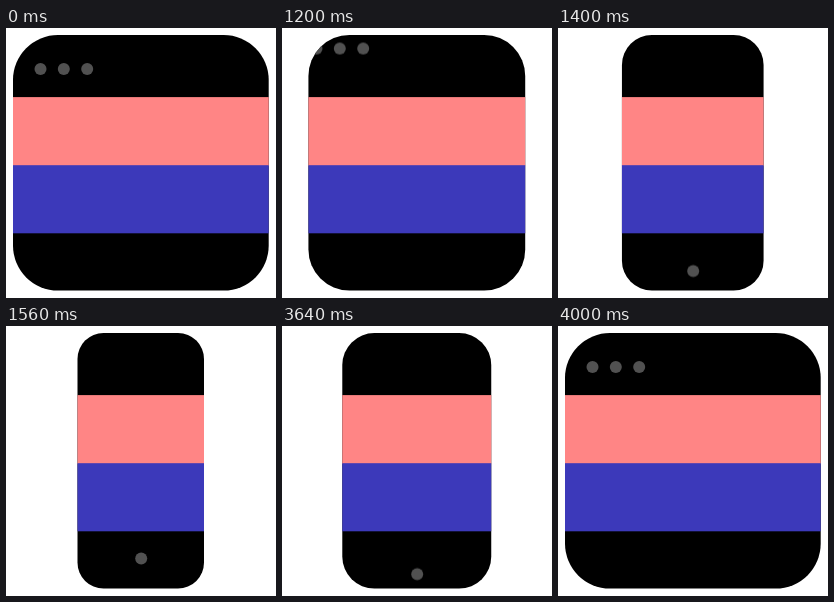
Write an HTML page that moves like this. It is 270 px wide and 270 px high and loops after 5.04 s.

```html
<!DOCTYPE html>
<html lang="en">
<head>
<meta charset="utf-8">
<title>Window to phone</title>
<style>
  html, body { margin: 0; width: 100%; height: 100%; overflow: hidden; background: #fff; }
  svg { display: block; width: 100%; height: 100%; }

  .shell { animation: width 5040ms infinite, corner 5040ms infinite; }
  .dots { animation: dots 5040ms infinite; }
  .home { animation: home 5040ms infinite; }

  @keyframes width {
    0%, 100% { x: 7px; width: 255.7px; }
    19.8413% { x: 7px; width: 255.7px; animation-timing-function: cubic-bezier(.44, 0, .46, 1); }
    30.9524% { x: 71.5px; width: 126.5px; }
    68.254% { x: 71.5px; width: 126.5px; animation-timing-function: cubic-bezier(.58, 0, .587, 1); }
    79.3651% { x: 7px; width: 255.7px; }
  }
  @keyframes corner {
    0%, 100% { rx: 45px; ry: 45px; }
    19.8413% { rx: 45px; ry: 45px; animation-timing-function: cubic-bezier(.5, 0, .62, 1); }
    30.9524% { rx: 26px; ry: 26px; }
    68.254% { rx: 26px; ry: 26px; animation-timing-function: cubic-bezier(.42, 0, .45, 1); }
    79.3651% { rx: 45px; ry: 45px; }
  }
  @keyframes dots {
    0%, 100% { transform: translateY(0); }
    19.8413% { transform: translateY(0); animation-timing-function: cubic-bezier(.44, 0, .46, 1); }
    30.9524% { transform: translateY(-68px); }
    68.254% { transform: translateY(-68px); animation-timing-function: cubic-bezier(.58, 0, .587, 1); }
    79.3651% { transform: translateY(0); }
  }
  @keyframes home {
    0%, 100% { transform: translateY(90px); }
    19.8413% { transform: translateY(90px); animation-timing-function: cubic-bezier(.44, 0, .46, 1); }
    30.9524% { transform: translateY(0); }
    68.254% { transform: translateY(0); animation-timing-function: cubic-bezier(.58, 0, .587, 1); }
    79.3651% { transform: translateY(90px); }
  }
</style>
</head>
<body>
<svg viewBox="0 0 270 270">
  <clipPath id="shape"><rect class="shell" y="7" height="255.6"/></clipPath>
  <rect class="shell" y="7" height="255.6"/>
  <g clip-path="url(#shape)">
    <rect y="69.1" width="270" height="69" fill="#ff8585"/>
    <rect y="137.2" width="270" height="68.1" fill="#3c39ba"/>
    <g class="dots" fill="#515151">
      <circle cx="34.5" cy="41" r="6"/>
      <circle cx="57.8" cy="41" r="6"/>
      <circle cx="81.2" cy="41" r="6"/>
    </g>
    <circle class="home" cx="135.2" cy="232.5" r="6" fill="#515151"/>
  </g>
</svg>
</body>
</html>
```
